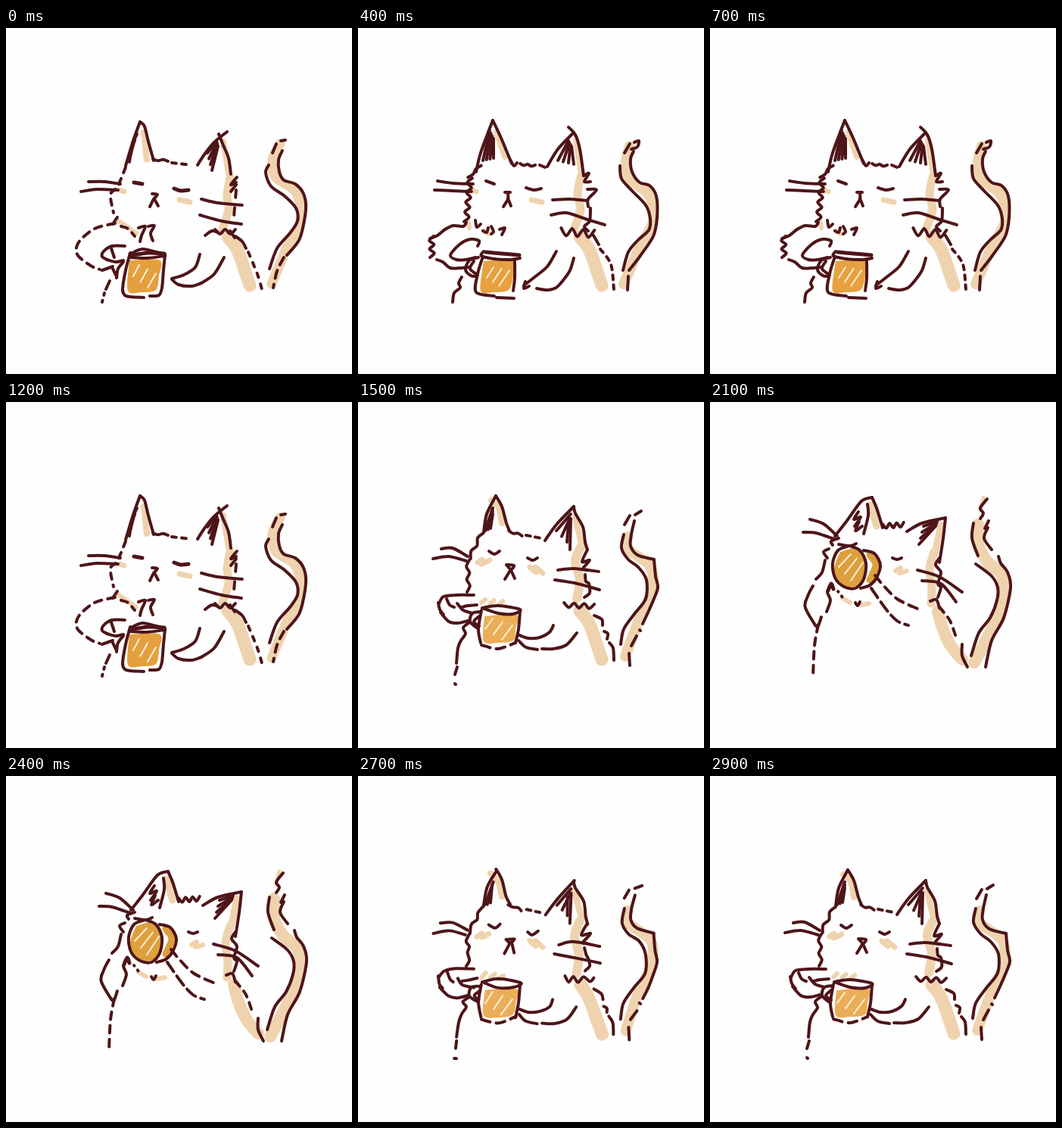
An HTML page with a canvas for the animation above (3000 ms loop, 457x457 px).

```html
<!DOCTYPE html>
<html>
<head>
<meta charset="utf-8">
<style>
html, body { margin: 0; width: 100%; height: 100%; overflow: hidden; background: #fefefe; }
canvas { display: block; }
</style>
</head>
<body>
<canvas id="stage" width="457" height="457"></canvas>
<script>
const ctx = document.getElementById('stage').getContext('2d');
const INK = '#4e1519', TAN = '#efd3ae', FOAM = '#fbeed9', PAPER = '#fefefe';
let seed = 0, count = 0;

function wobble() {
  const s = Math.sin(++count * 12.9898 + seed * 78.233) * 43758.5453;
  return seed ? (s - Math.floor(s) - 0.5) * 2.6 : 0;
}

// Smooth curve through x, y, x, y, ...
function trace(flat) {
  const p = [];
  for (let i = 0; i < flat.length; i += 2) p.push([flat[i] + wobble(), flat[i + 1] + wobble()]);
  ctx.beginPath();
  ctx.moveTo(...p[0]);
  for (let i = 0; i < p.length - 1; i++) {
    const b = p[i], c = p[i + 1], a = p[i - 1] || b, d = p[i + 2] || c;
    ctx.bezierCurveTo(b[0] + (c[0] - a[0]) / 6.5, b[1] + (c[1] - a[1]) / 6.5,
      c[0] - (d[0] - b[0]) / 6.5, c[1] - (d[1] - b[1]) / 6.5, ...c);
  }
}

function stroke(color, width, points) {
  trace(points);
  ctx.strokeStyle = color;
  ctx.lineWidth = width;
  ctx.stroke();
}

const ink = (...points) => stroke(INK, 4, points);
const bold = (...points) => stroke(INK, 5, points);
const tan = (width, ...points) => stroke(TAN, width, points);

function dash(on, off, ...points) {
  ctx.setLineDash([on, off]);
  ink(...points);
  ctx.setLineDash([]);
}

// Zigzag edge of n points from one end to the other.
function fur(n, size, x0, y0, x1, y1) {
  const length = Math.hypot(x1 - x0, y1 - y0), points = [];
  for (let i = 0; i < n; i++) {
    const t = i / (n - 1), side = (i % 2 ? size : -size) / length;
    points.push(x0 + (x1 - x0) * t - (y1 - y0) * side, y0 + (y1 - y0) * t + (x1 - x0) * side);
  }
  ink(...points);
}

// n strokes spread evenly from the first line to the last.
function hatch(n, color, width, first, last) {
  for (let i = 0; i < n; i++) {
    stroke(color, width, first.map((v, k) => v + (last[k] - v) * i / (n - 1)));
  }
}

function beer(color, ...points) {
  trace(points);
  ctx.fillStyle = color;
  ctx.fill();
}

function torso() {
  tan(17, 293, 276, 306, 294, 322, 340);
}

function resting() {
  tan(13, 362, 153, 352, 174, 356, 197, 383, 217, 389, 255, 371, 290, 351, 338);
  tan(8, 182, 138, 186, 174);
  tan(8, 287, 150, 294, 192);
  tan(11, 296, 197, 292, 220, 294, 240, 285, 268);
  torso();
  tan(7, 150, 214, 156, 216);
  tan(7, 229, 227, 243, 230);
  tan(6, 146, 253, 172, 271);

  beer('#e4a03e', 163, 307, 203, 307, 202, 328, 198, 346, 180, 349, 161, 347, 163, 307);
  hatch(3, FOAM, 2, [176, 313, 168, 328], [198, 324, 187, 343]);

  ink(158, 182, 163, 165, 170, 143, 177, 124);
  ink(177, 124, 183, 130, 188, 150, 195, 175);
  hatch(4, INK, 4, [173, 140, 167, 152], [165, 163, 163, 177]);
  fur(4, 1, 194, 174, 214, 175);
  dash(6, 7, 219, 178, 244, 181);
  ink(253, 181, 262, 167, 275, 151, 292, 137);
  ink(281, 140, 287, 155, 294, 172, 297, 193);
  hatch(4, INK, 4, [278, 149, 266, 165], [280, 156, 272, 188]);

  dash(8, 8, 158, 184, 147, 210, 138, 220, 142, 244);
  ink(147, 250, 141, 259);
  ink(109, 203, 130, 203, 151, 206);
  ink(99, 216, 120, 213, 148, 214);
  bold(169, 204, 180, 206);
  bold(222, 212, 231, 215, 241, 214);
  ink(193, 219, 200, 220, 195, 226, 190, 236);
  ink(196, 226, 201, 235);
  ink(258, 226, 280, 231, 312, 234);
  ink(256, 247, 285, 255, 311, 259);
  ink(305, 197, 297, 207, 304, 204);
  ink(304, 207, 297, 216);
  dash(10, 13, 304, 214, 301, 249);
  ink(263, 274, 272, 268, 280, 270);
  fur(5, 3, 276, 269, 303, 269);
  ink(296, 268, 302, 277);
  ink(303, 275, 312, 282, 317, 291);
  dash(6, 9, 320, 296, 332, 325, 338, 345);
  dash(9, 8, 152, 262, 161, 265, 170, 275);
  ink(175, 264, 184, 262, 179, 274, 177, 282);
  ink(188, 262, 196, 261, 191, 271, 194, 281);

  dash(10, 8, 144, 258, 117, 265, 96, 283, 94, 299, 112, 314, 124, 319);
  ink(127, 320, 141, 315);
  ink(157, 288, 140, 288, 129, 295, 127, 302, 134, 306);
  ink(139, 291, 143, 303);
  ink(133, 306, 145, 309, 155, 307);
  ink(155, 309, 148, 318, 146, 330);
  ink(141, 318, 146, 328);
  ink(137, 334, 132, 345);
  dash(3, 7, 130, 350, 127, 362);
  ink(256, 299, 250, 316, 235, 326, 219, 331);
  ink(219, 332, 228, 339, 245, 341, 258, 337);
  ink(258, 337, 275, 325, 288, 303);

  ink(164, 297, 158, 320, 154, 345, 157, 353, 164, 355, 182, 356);
  ink(165, 298, 180, 292, 199, 296, 210, 299);
  ink(163, 303, 185, 304, 210, 301);
  bold(167, 300, 188, 297, 209, 298);
  ink(210, 300, 208, 320, 206, 343, 202, 353, 190, 354);

  ink(357, 153, 352, 165);
  ink(347, 181, 343, 191, 350, 209, 368, 222, 383, 238, 385, 255, 375, 271, 358, 291, 348, 318);
  ink(369, 148, 363, 149);
  ink(365, 162, 360, 174, 361, 190, 367, 201, 382, 206, 393, 219, 396, 240, 388, 278, 371, 300);
  dash(11, 8, 367, 303, 358, 321, 353, 343);
}

function restingAlt() {
  tan(14, 359, 156, 354, 176, 357, 198, 384, 220, 390, 255, 372, 290, 351, 338);
  tan(8, 183, 138, 194, 170);
  tan(8, 288, 148, 295, 192);
  tan(11, 294, 197, 290, 220, 294, 240, 286, 264);
  torso();
  tan(7, 151, 214, 156, 216);
  tan(7, 229, 227, 243, 230);
  tan(6, 146, 257, 147, 264);
  tan(6, 166, 268, 172, 272);

  beer('#e7a140', 166, 308, 206, 307, 205, 328, 199, 346, 180, 349, 162, 347, 166, 308);
  hatch(3, FOAM, 2, [179, 316, 170, 330], [200, 320, 186, 341]);

  ink(156, 190, 162, 165, 178, 122);
  ink(178, 122, 188, 143, 203, 179);
  hatch(4, INK, 4, [174, 136, 165, 175], [179, 146, 179, 172]);
  ink(201, 174, 206, 182, 210, 178);
  fur(5, 1, 214, 180, 234, 182);
  ink(240, 181, 247, 184);
  ink(250, 183, 264, 160, 285, 138);
  ink(278, 131, 287, 141, 293, 160, 298, 195);
  hatch(4, INK, 4, [278, 149, 264, 175], [282, 156, 285, 180]);

  fur(4, 1, 162, 181, 146, 198);
  fur(10, 3, 148, 198, 143, 256);
  ink(105, 202, 125, 205, 152, 206);
  ink(101, 214, 125, 215, 150, 216);
  ink(169, 202, 180, 206);
  ink(222, 211, 232, 214, 242, 212);
  ink(194, 217, 201, 217);
  ink(198, 218, 198, 226, 192, 236);
  ink(198, 225, 202, 235);
  ink(257, 227, 280, 226, 302, 228);
  ink(255, 247, 275, 244, 300, 252, 326, 260);
  ink(298, 195, 305, 192, 299, 203, 307, 203);
  ink(303, 213, 315, 214, 304, 226, 304, 236);
  ink(307, 238, 306, 255, 299, 262, 304, 268);
  fur(7, 5, 268, 269, 312, 272);
  ink(311, 274, 318, 286);
  dash(6, 7, 320, 292, 334, 312, 338, 345);
  ink(155, 254, 157, 263, 162, 259);
  ink(165, 268, 170, 270, 172, 264);
  ink(176, 262, 179, 269, 176, 272);
  ink(187, 266, 194, 264, 190, 273);

  ink(143, 257, 139, 262, 126, 261, 115, 266, 105, 274, 95, 278);
  fur(6, 3, 97, 275, 98, 303);
  ink(104, 306, 112, 309, 122, 317, 135, 317, 146, 316);
  ink(158, 288, 160, 281, 148, 279, 134, 286, 122, 300, 130, 306, 142, 306, 155, 303);
  ink(159, 303, 147, 307, 142, 319, 149, 327, 157, 328);
  ink(153, 308, 148, 318, 158, 326);
  ink(137, 329, 133, 337, 135, 343, 127, 350, 125, 362);
  ink(262, 295, 250, 315, 232, 330, 219, 340);
  ink(221, 335, 219, 344, 226, 341);
  ink(236, 344, 250, 346, 263, 342, 279, 322, 285, 304);

  ink(166, 295, 163, 301, 180, 305, 200, 306, 214, 304);
  bold(169, 296, 190, 298, 213, 300);
  ink(165, 302, 158, 325, 156, 349, 180, 354);
  ink(183, 356, 206, 357);
  ink(207, 306, 207, 330, 205, 347);

  ink(359, 153, 352, 165);
  ink(346, 182, 348, 199, 362, 215, 380, 234, 386, 252, 384, 267, 370, 280, 357, 296, 350, 320);
  ink(361, 160, 369, 157, 371, 149, 365, 151);
  ink(364, 163, 360, 173, 362, 190, 372, 204, 385, 208, 394, 222, 395, 250, 390, 275, 372, 302, 358, 320);
  ink(357, 328, 356, 346);
}

function lifting() {
  tan(14, 356, 178, 356, 194, 386, 217, 388, 250, 371, 288, 353, 336);
  tan(8, 176, 130, 186, 140, 190, 160);
  tan(8, 287, 152, 295, 188);
  tan(12, 294, 192, 287, 210, 293, 235, 289, 260);
  torso();
  tan(7, 158, 212, 164, 208, 163, 214, 174, 209);
  tan(7, 227, 218, 235, 225, 234, 218, 244, 226);
  hatch(3, TAN, 6, [163, 265, 168, 261], [186, 267, 191, 263]);

  beer('#ebae58', 167, 283, 209, 281, 208, 300, 205, 315, 186, 318, 166, 316, 167, 283);
  hatch(3, FOAM, 2, [178, 286, 168, 300], [204, 295, 190, 314]);

  ink(166, 172, 170, 148, 182, 124);
  ink(182, 124, 190, 138, 196, 160, 200, 170);
  hatch(3, INK, 4, [178, 140, 168, 170], [178, 148, 175, 167]);
  fur(4, 1, 199, 171, 217, 176);
  dash(6, 6, 222, 176, 242, 180);
  ink(247, 183, 262, 162, 285, 138);
  ink(285, 138, 287, 147, 297, 165, 300, 185, 303, 195);
  hatch(3, INK, 4, [281, 148, 262, 170], [278, 160, 276, 185]);
  ink(281, 154, 280, 195);

  fur(5, 2, 164, 172, 147, 206);
  fur(6, 2, 145, 209, 146, 251);
  ink(110, 194, 125, 193, 145, 204);
  ink(99, 207, 120, 204, 143, 210);
  ink(173, 197, 180, 201, 187, 197);
  ink(224, 206, 231, 209, 237, 206);
  ink(196, 215, 206, 216, 202, 221, 196, 215);
  ink(202, 221, 194, 234);
  ink(202, 222, 207, 233);
  ink(264, 222, 285, 220, 318, 224);
  ink(260, 235, 290, 240, 319, 248);
  ink(303, 195, 296, 211, 306, 209, 297, 220, 303, 222);
  ink(300, 228, 301, 237, 305, 240, 306, 252, 299, 258);
  fur(7, 3, 272, 268, 312, 270);
  ink(312, 282, 322, 287, 323, 295);
  ink(325, 303, 330, 306, 329, 313);
  ink(332, 318, 337, 325, 338, 341);

  ink(153, 255, 130, 255, 113, 257, 107, 266);
  ink(106, 265, 108, 274, 113, 281);
  ink(109, 278, 120, 290, 132, 292, 145, 289);
  ink(157, 268, 145, 269, 137, 271);
  ink(131, 266, 139, 275, 152, 279);
  ink(117, 260, 121, 268, 127, 271);
  ink(162, 277, 151, 279, 148, 290, 158, 299);
  ink(160, 283, 153, 290, 160, 296);
  ink(147, 291, 139, 298, 142, 306, 136, 315, 132, 325, 130, 345);
  ink(131, 350, 128, 360);
  ink(128, 372, 129, 373);
  ink(213, 308, 225, 312, 240, 311, 253, 304, 258, 295);
  ink(212, 315, 222, 324, 237, 327);
  ink(243, 326, 258, 326, 275, 321, 289, 305);

  ink(164, 272, 185, 269, 214, 274, 205, 280, 185, 279, 164, 272);
  ink(163, 275, 159, 300, 162, 318);
  dash(12, 8, 163, 321, 185, 326, 208, 318);
  ink(214, 276, 212, 300, 208, 318);

  ink(359, 150, 352, 162);
  ink(374, 144, 366, 149);
  ink(351, 175, 348, 193, 357, 208, 371, 219, 381, 235, 380, 260, 365, 280, 351, 300, 347, 320);
  ink(365, 157, 361, 175, 360, 190, 369, 202, 391, 208);
  ink(391, 208, 393, 230, 396, 245, 390, 262, 383, 278, 376, 293);
  ink(372, 301, 373, 302);
  ink(368, 309, 361, 322);
  ink(358, 332, 359, 348);
}

function drinking() {
  tan(16, 354, 162, 354, 188, 367, 212, 385, 228, 388, 255, 378, 288, 349, 344);
  tan(5, 361, 126, 357, 142);
  tan(9, 212, 136, 216, 150, 220, 164);
  tan(9, 305, 162, 297, 200);
  tan(11, 296, 198, 290, 220, 293, 245, 292, 266);
  tan(16, 301, 276, 307, 298, 318, 322, 333, 340);
  tan(6, 245, 223, 252, 219, 250, 226, 260, 223);
  tan(6, 175, 259, 185, 265);
  tan(6, 200, 268, 210, 266);

  stroke('#dda03c', 9, [211, 202, 219, 215, 211, 235]);
  beer('#dda03c', 172, 198, 192, 193, 203, 204, 206, 223, 200, 240, 184, 245, 170, 240, 164, 220, 172, 198);
  hatch(3, FOAM, 2, [186, 201, 170, 218], [202, 212, 186, 236]);

  ink(165, 177, 180, 158, 200, 131, 214, 126);
  ink(214, 126, 220, 140, 228, 166);
  ink(208, 135, 209, 150, 203, 174);
  ink(196, 145, 190, 155, 199, 152, 191, 164);
  ink(197, 158, 192, 170, 201, 164);
  fur(7, 3, 228, 164, 256, 162);
  ink(260, 171, 280, 160, 311, 153);
  ink(311, 153, 308, 180, 303, 212);
  hatch(4, INK, 4, [282, 164, 300, 158], [276, 188, 298, 164]);

  ink(132, 155, 150, 161, 168, 177);
  ink(123, 172, 140, 173, 164, 181);
  ink(170, 180, 160, 184, 162, 189);
  ink(157, 194, 150, 198, 155, 206);
  ink(241, 206, 247, 208, 253, 206);
  ink(192, 265, 195, 269, 198, 264);
  dash(1, 7, 169, 250, 175, 258);
  ink(274, 222, 303, 231, 333, 251);
  ink(280, 236, 305, 240, 325, 264);
  ink(303, 206, 298, 215, 305, 225, 301, 240, 305, 245, 301, 258);
  ink(291, 263, 299, 261, 303, 272);
  dash(9, 8, 303, 271, 317, 289, 326, 314);
  ink(333, 320, 333, 335, 340, 350);

  ink(152, 209, 148, 225, 140, 234);
  ink(136, 243, 131, 252, 126, 264);
  ink(126, 264, 126, 272, 136, 290, 142, 297, 147, 284);
  ink(160, 242, 155, 251, 159, 262, 154, 277);
  bold(156, 249, 160, 240, 163, 247);
  dash(10, 8, 143, 294, 138, 322, 136, 362);
  dash(15, 7, 213, 246, 232, 273, 247, 289, 262, 295);
  dash(12, 8, 218, 229, 227, 240, 247, 260, 274, 273);

  ink(184, 190, 198, 196, 206, 213, 203, 234, 192, 246, 177, 244, 165, 232, 162, 213, 169, 196, 184, 190);
  ink(170, 188, 185, 190, 193, 187);
  ink(203, 196, 217, 200, 225, 215, 220, 232, 211, 242, 199, 246);

  ink(348, 160, 346, 180, 354, 203);
  ink(351, 214, 372, 230, 380, 245, 379, 262, 370, 285, 355, 305, 345, 335);
  ink(366, 128, 357, 140, 361, 147, 357, 154);
  ink(368, 157, 363, 167);
  ink(367, 166, 362, 180, 372, 195);
  ink(381, 204, 384, 213, 393, 225, 397, 245, 388, 285, 372, 315, 364, 350);
}

// Each pose boils through three drawings: [pose, wobble seed].
const rest = [[resting, 0], [restingAlt, 0], [resting, 5]];
const lift = [[lifting, 0], [lifting, 2], [lifting, 3]];
const drink = [[drinking, 0], [drinking, 2], [drinking, 3]];
const sequence = [rest, rest, rest, rest, rest, lift, lift, drink, drink, [...lift].reverse()].flat();

ctx.lineCap = ctx.lineJoin = 'round';
let shown = -1;

function tick() {
  const step = Math.floor(performance.now() / 100) % sequence.length;
  if (step !== shown) {
    shown = step;
    count = 0;
    const [pose, poseSeed] = sequence[step];
    seed = poseSeed;
    ctx.fillStyle = PAPER;
    ctx.fillRect(0, 0, 457, 457);
    pose();
  }
  requestAnimationFrame(tick);
}
tick();
</script>
</body>
</html>
```
